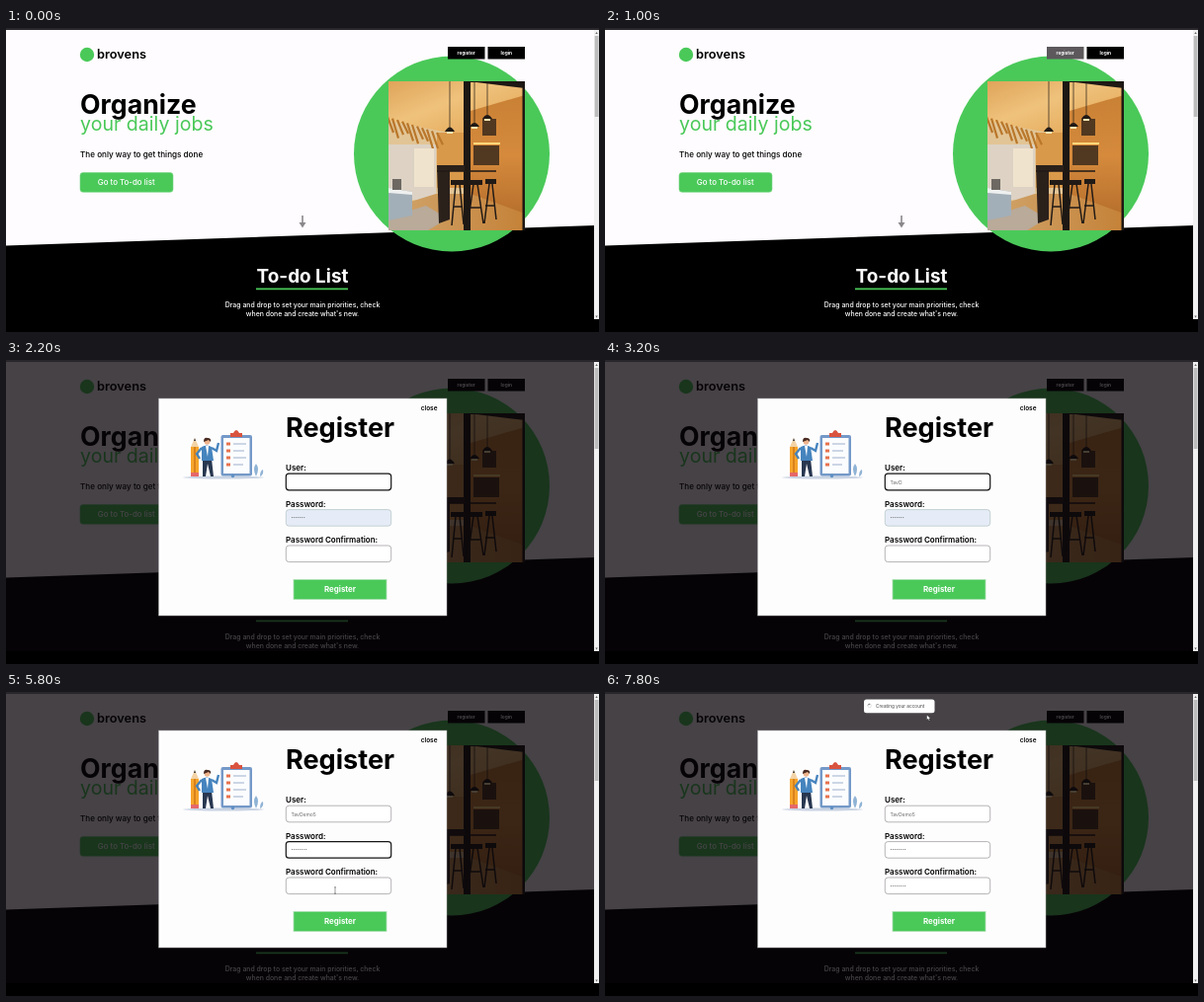
An HTML page for the animation above (8 s loop, 600 px wide and 308 px high).

```html
<!DOCTYPE html>
<html lang="en">
<head>
<meta charset="utf-8">
<title>Register</title>
<style>
  html, body { margin: 0; width: 100%; height: 100%; overflow: hidden; background: #000; }
  svg { display: block; width: 100vw; height: 100vh; }
  text { font-family: Inter, "Open Sans", sans-serif; font-weight: 500; }
  .semi { font-weight: 600; }
  .bold { font-weight: 700; }
  .regular { font-weight: 400; }
  .mid { text-anchor: middle; }
  .white { fill: #fff; }
  .green { fill: #4ac959; }
  .value { font-size: 5px; font-weight: 400; fill: #666; }
  .secret { font-size: 3.6px; }
</style>
</head>
<body>
<svg viewBox="0 0 600 308">
  <defs>
    <linearGradient id="ceiling" x2="1" y2="1">
      <stop stop-color="#dfa45a"/><stop offset=".4" stop-color="#efc27c"/><stop offset="1" stop-color="#e0a04e"/>
    </linearGradient>
    <linearGradient id="brick" x2="0" y2="1">
      <stop stop-color="#c98135"/><stop offset=".5" stop-color="#d58a3c"/><stop offset="1" stop-color="#b56e2c"/>
    </linearGradient>
    <linearGradient id="floor" x2="1">
      <stop stop-color="#d0a56c"/><stop offset="1" stop-color="#c58238"/>
    </linearGradient>
    <clipPath id="photoClip"><path d="M387 54h138v151H387z"/></clipPath>
  </defs>

  <!-- Landing page -->
  <rect width="600" height="308"/>
  <path d="M0 0H596V200L0 220.500Z" fill="#fefcfe"/>
  <circle class="green" cx="451" cy="127.500" r="99"/>
  <circle class="green" cx="82" cy="27" r="7.200"/>
  <text class="semi" x="92" y="30.500" font-size="12.800">brovens</text>
  <rect id="registerLink" x="447" y="19" width="37.500" height="12.500"/>
  <rect x="487.500" y="19" width="37.500" height="12.500"/>
  <text class="bold mid white" x="465.700" y="27" font-size="4.800">register</text>
  <text class="bold mid white" x="506.200" y="27" font-size="4.800">login</text>

  <text class="bold" x="75" y="86.500" font-size="26.700">Organize</text>
  <text class="regular green" x="75" y="104" font-size="19.600">your daily jobs</text>
  <text x="75" y="131" font-size="8.150">The only way to get things done</text>
  <rect class="green" x="75" y="146.500" width="94" height="19.800" rx="3" stroke="#78d584" stroke-width=".6"/>
  <text class="mid white" x="121.700" y="159" font-size="7.900">Go to To-do list</text>
  <path d="M299.200 190h1.600v7h2.700l-3.500 5.500-3.500-5.500h2.700z" fill="#8b888b"/>

  <g clip-path="url(#photoClip)">
    <path d="M387 54h138v151H387z" fill="#e2c596"/>
    <path d="M387 54h138v40l-57 16-81-16z" fill="url(#ceiling)"/>
    <path d="M387 118h48v56h-48z" fill="#ddd2c4"/>
    <path d="M436 106h27v56h-27z" fill="#d9994a"/>
    <path d="M470 84 525 68v124l-55-19z" fill="url(#brick)"/>
    <path d="M387 183 435 168h35l55 20v17H387z" fill="url(#floor)"/>
    <path d="M387 192 425 180l22 13-20 12h-40z" fill="#b9aa99"/>
    <path id="slats" fill="none" stroke="#b9772b" stroke-width="2.200"/>
    <path d="M387 162 411 166v24l-24 5z" fill="#a3afb8"/>
    <path d="M387 162 411 166v3l-24-2z" fill="#eef0ef"/>
    <path d="M391 153h9v11h-9z" fill="#6d6862"/>
    <path d="M413 122h20v39h-20z" fill="#efe3cd"/>
    <path d="M473 119h26v20h-26zM482 92h14v17h-14z" fill="#513820"/>
    <path d="M473 116h27v2h-27z" fill="#ffd779"/>
    <path d="M468 54h57v7zM463 54h7v151h-7zM522.500 54h2.500v151h-2.500z" fill="#1d1814"/>
    <path d="M436 139h28v6h-15v49l-11 4z" fill="#2b211b"/>
    <g fill="none" stroke="#211a16">
      <path d="M449 54v47M474 54v42M487 54v34" stroke-width=".7"/>
      <path d="M455 158l-4 42M459 158l4 41M473 158l-6 43M477 158l6 40M489 158l-5 40M492 158l4 36M453 181h9M469 182h12M485 180h9M436 145h60" stroke-width="1.500"/>
    </g>
    <path d="M444 105q5-9 10 0zM469 100q5-8 10 0zM482 92q5-8 10 0zM450 154h14v5h-14zM469 154h13v5h-13zM485 153h11v5h-11z" fill="#211a16"/>
    <path d="M446 105h6v2h-6zM471 100h6v2h-6zM484 92h6v2h-6z" fill="#fff0b5"/>
  </g>

  <text class="bold mid white" x="300" y="258" font-size="18.900">To-do List</text>
  <path class="green" d="M253 263.500h93v1.700h-93z"/>
  <text class="mid white" x="300" y="282.700" font-size="6.900">Drag and drop to set your main priorities, check</text>
  <text class="mid white" x="300" y="291.500" font-size="6.900">when done and create what's new.</text>
  <rect y="295" width="600" height="13"/>

  <!-- Register dialog -->
  <g id="dialog">
    <rect width="595" height="295" fill="#080508" fill-opacity=".75"/>
    <rect x="154.500" y="39" width="291.500" height="220" fill="#fefdfe" stroke="#aaa" stroke-width=".5"/>
    <text class="semi" x="436.500" y="51" font-size="6.500" text-anchor="end">close</text>
    <text class="bold" x="283" y="78" font-size="27.100">Register</text>
    <g id="fields"></g>
    <rect class="green" x="291" y="222.500" width="94" height="20" stroke="#a9dfaf" stroke-width=".8"/>
    <text class="bold mid white" x="338" y="235.200" font-size="7.900">Register</text>

    <g id="drawing">
      <ellipse cx="220" cy="119" rx="41" ry="1.500" fill="#c9d3e2"/>
      <path d="M187 88h8v26h-8z" fill="#f6a52c"/>
      <path d="M190 88h2v26h-2z" fill="#d9821c"/>
      <path d="M187 88 191 79l4 9z" fill="#f3d3a5"/>
      <path d="M190 82 191 79l1 3z" fill="#333"/>
      <path d="M187 114h8v4h-8z" fill="#e5686a"/>
      <path d="M199 100h9l2 18h-3l-3-13-2 13h-3z" fill="#283750"/>
      <path d="M198 88q5-3 10 0l2 14h-12z" fill="#4684be"/>
      <path d="M198 89l-5 6 3 5M208 89l5 3 2-8" fill="none" stroke="#4684be" stroke-width="2.400"/>
      <path d="M202 87h3l-1 11z" fill="#fff"/>
      <circle cx="203.500" cy="83" r="2.800" fill="#efb48d"/>
      <path d="M200 83q0-5 4-4 4 0 3 4l-2-2z" fill="#4a2a20"/>
      <rect x="217.500" y="76" width="31.500" height="41.500" rx="2" fill="#7499c8"/>
      <path d="M220 79h26.500v36H220z" fill="#fbfcfe"/>
      <path d="M227 78v-4h3q3-6 6 0h3v4z" fill="#d9533f"/>
      <path d="M223 85h4M223 92h4M223 99h4M223 106h4" stroke="#e8724d" stroke-width="3"/>
      <path d="M230 85h13M230 92h11M230 99h13M230 106h10" stroke="#9db0cc" stroke-width="1.200"/>
      <circle cx="229.500" cy="117.500" r="1.700" fill="#5d8fc4"/>
      <path d="M253 118q-4-8 0-13 4 5 0 13M257 118q0-6 3-7 1 5-3 7" fill="#8fb3d5"/>
    </g>
  </g>

  <g id="toast">
    <rect x="262" y="7.500" width="71.500" height="13.700" rx="2.500" fill="#fff"/>
    <circle cx="267.700" cy="14" r="1.800" fill="none" stroke="#ddd" stroke-width=".7"/>
    <path id="spinner" d="M267.700 12.200a1.800 1.800 0 0 1 1.800 1.800" fill="none" stroke="#555" stroke-width=".7"/>
    <text class="regular" x="274" y="15.800" font-size="4.700" fill="#444">Creating your account</text>
  </g>

  <!-- Browser edges -->
  <rect width="600" height="2" fill="#29272c"/>
  <path d="M595 2h5v293h-5z" fill="#f1f1f1"/>
  <path d="M595.700 8h3.800v82h-3.800z" fill="#bdbcbd"/>
  <path d="M596.300 6 597.600 4l1.200 2zM596.300 291.500l1.300 2 1.200-2z" fill="#666"/>

  <g id="pointer">
    <path id="arrow" d="M0-2v5.500l1.300-1.200 1 2 1-.5-1-1.900h1.700z" fill="#fff" stroke="#111" stroke-width=".4"/>
    <path id="beam" d="M-1-3.200h2M0-3.200v6.400M-1 3.200h2" fill="none" stroke="#555" stroke-width=".6"/>
  </g>
</svg>

<script>
const LOOP = 8000, STEP = 200;
const USER = "TavDemo5";
const $ = id => document.getElementById(id);
const show = (id, on) => $(id).setAttribute("visibility", on ? "inherit" : "hidden");
const between = (t, from, to) => t >= from && t < to;

function setAttrs(node, attrs) {
  for (const [key, value] of Object.entries(attrs)) node.setAttribute(key, value);
}

function add(parent, tag, attrs, content = "") {
  const node = document.createElementNS("http://www.w3.org/2000/svg", tag);
  setAttrs(node, attrs);
  node.textContent = content;
  return parent.appendChild(node);
}

const fields = ["User:", "Password:", "Password Confirmation:"].map((label, i) => {
  const y = 115.2 + i * 36.4, group = $("fields");
  add(group, "text", { class: "semi", x: 283, y: y - 2.8, "font-size": 8 }, label);
  return {
    box: add(group, "rect", { x: 283.3, y, width: 106.4, height: 16.6, rx: 3 }),
    mark: add(group, "rect", { x: 288, y: y + 5.6, width: 22, height: 6.4, fill: "#4095b5" }),
    text: add(group, "text", { class: i ? "value secret" : "value", x: 288.5, y: y + (i ? 9.8 : 10.5) })
  };
});

function drawField({ box, mark, text }, value, { focus = false, saved = false, selected = false } = {}) {
  setAttrs(box, {
    fill: saved ? "#e6ecf7" : "#fff",
    stroke: focus ? "#151515" : saved ? "#a5b9b5" : "#858285",
    "stroke-width": focus ? 1.2 : 0.6
  });
  mark.setAttribute("visibility", selected ? "inherit" : "hidden");
  text.style.fill = selected ? "#fff" : "";
  text.textContent = value;
}

// Pointer stops: time, x, y
const stops = [[5000, 325, 161], [5400, 325, 161], [5800, 333, 201], [6200, 333, 201],
  [6600, 338, 234], [6800, 338, 234], [7400, 325.5, 25], [LOOP, 325.5, 25]];

function pointerAt(t) {
  const next = Math.max(1, stops.findIndex(stop => stop[0] > t));
  const [t0, x0, y0] = stops[next - 1], [t1, x1, y1] = stops[next];
  const p = (t - t0) / (t1 - t0), eased = p * p * (3 - 2 * p);
  return [x0 + (x1 - x0) * eased, y0 + (y1 - y0) * eased];
}

function render(t) {
  $("registerLink").setAttribute("fill", between(t, 800, 1200) ? "#5c585b" : "#000");
  show("dialog", t >= 1200);
  show("drawing", t >= 1400);
  show("toast", t >= 7000);
  $("spinner").setAttribute("transform", `rotate(${t * 0.36} 267.7 14)`);

  const dots = n => "•".repeat(n);
  const typed = Math.max(0, Math.floor((t - 2600) / STEP) + 1);
  const saved = between(t, 1400, 5200);
  drawField(fields[0], USER.slice(0, typed), {
    focus: between(t, 2000, 5000), selected: between(t, 4400, 5000)
  });
  drawField(fields[1], dots(saved ? 7 : t >= 5400 ? 8 : 0), { focus: between(t, 5000, 6000), saved });
  drawField(fields[2], dots(t >= 6200 ? 8 : 0), { focus: between(t, 6000, 6600) });

  show("pointer", t >= 5000);
  if (t >= 5000) $("pointer").setAttribute("transform", `translate(${pointerAt(t)})`);
  show("beam", t < 6400);
  show("arrow", t >= 6400);
}

$("slats").setAttribute("d", Array.from({ length: 11 }, (_, i) =>
  `M${386 + i * 5} ${90 + i * 1.6}l6 ${16 + 4 * Math.sin(i * 1.7)}`).join(""));

function tick(now) {
  render(Math.floor(now % LOOP / STEP) * STEP);
  requestAnimationFrame(tick);
}
render(0);
requestAnimationFrame(tick);
</script>
</body>
</html>
```
